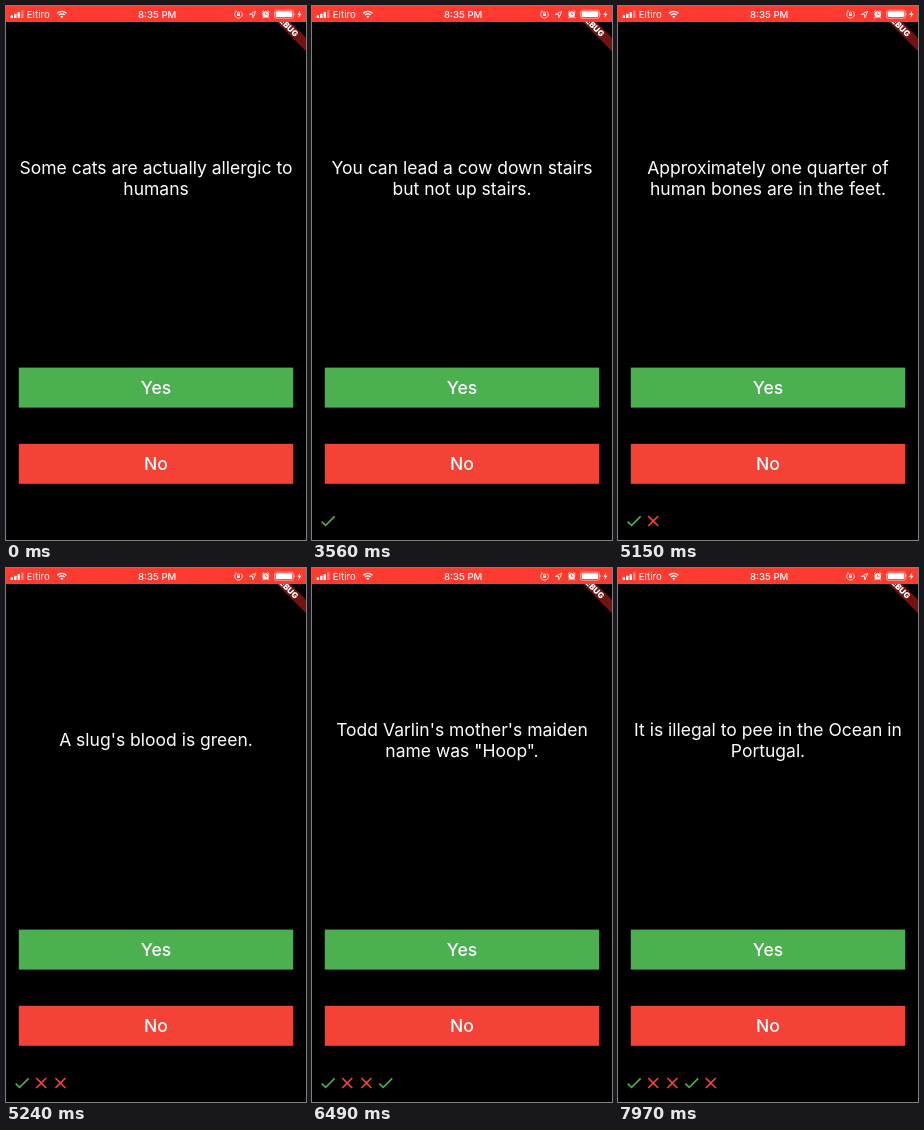
Animation of 300 by 534 pixels, one loop 8 s. Source, as an HTML page:

```html
<!DOCTYPE html>
<html lang="en">
<head>
<meta charset="utf-8">
<title>Quiz</title>
<style>
html, body { margin: 0; width: 100%; height: 100%; overflow: hidden; background: #000; }
svg { display: block; width: 300px; height: 534px; }
text { font-family: Inter, Roboto, "Liberation Sans", sans-serif; font-variation-settings: "opsz" 14; fill: #fff; }
.question, .label { font-size: 17.5px; text-anchor: middle; }
.label { font-weight: 500; }
.status { font-size: 9.6px; }
.line { fill: none; stroke: #fff; }
.yes { fill: #4caf50; }
.no { fill: #f44336; }
</style>
</head>
<body>
<svg viewBox="0 0 300 534">
  <defs>
    <path id="check" d="M9 16.17L4.83 12l-1.42 1.41L9 19 21 7l-1.41-1.41z"/>
    <path id="cross" d="M19 6.41L17.59 5 12 10.59 6.41 5 5 6.41 10.59 12 5 17.59 6.41 19 12 13.41 17.59 19 19 17.59 13.41 12z"/>
  </defs>
  <rect width="300" height="534"/>

  <g transform="translate(300 0) rotate(45)">
    <rect x="-32" y="22.4" width="64" height="9.6" fill="#731212"/>
    <text y="30.1" font-size="8.16" font-weight="900" text-anchor="middle">DEBUG</text>
  </g>

  <rect width="300" height="16" fill="#ff3b30"/>
  <g fill="#fff">
    <rect x="4.6" y="9.2" width="2.4" height="2.8" rx=".5"/>
    <rect x="8.1" y="7.8" width="2.4" height="4.2" rx=".5"/>
    <rect x="11.6" y="6.1" width="2.4" height="5.9" rx=".5"/>
    <rect x="15.1" y="4.3" width="2.4" height="7.7" rx=".5" opacity=".4"/>
  </g>
  <text class="status" x="20.8" y="11.6">Eltiro</text>
  <g class="line" stroke-width="1.4">
    <path d="M51.2 7.2a6.6 6.6 0 0 1 9.2 0M53 9.1a4 4 0 0 1 5.6 0"/>
    <path d="M55.8 12l-1.5-1.6a2.2 2.2 0 0 1 3 0z" fill="#fff" stroke="none"/>
  </g>
  <text class="status" x="151.2" y="11.6" font-weight="500" text-anchor="middle">8:35 PM</text>

  <g class="line" stroke-width=".8">
    <path d="M230.2 5.3a3.8 3.8 0 1 0 4.6 0M229.5 4.2l1.2 1.2-1.5.8"/>
    <rect x="231" y="7.8" width="3" height="2.2" fill="#fff" stroke="none"/>
    <path d="M231.5 8v-1a1 1 0 0 1 2 0v1"/>
    <path d="M243.4 8.4l6.5-3.3-3.1 6.7-.3-3.3z"/>
  </g>
  <circle cx="259.7" cy="8.4" r="3.2" fill="#fff"/>
  <path d="M259.7 6.4v2.2h1.7" fill="none" stroke="#ff3b30" stroke-width=".8"/>
  <path class="line" d="M256 6.2l1.9-1.8M263.4 6.2l-1.9-1.8M257.4 11.2l-.9 1M262 11.2l.9 1" stroke-width="1"/>
  <rect class="line" x="268.5" y="4.1" width="19" height="8.2" rx="2" stroke-width=".7" opacity=".65"/>
  <rect x="269.7" y="5.3" width="16.6" height="5.8" rx="1" fill="#fff"/>
  <path d="M288.4 6.8q1.5 1.4 0 2.8z" fill="#fff" opacity=".65"/>
  <path d="M294.2 4.4l-2.9 4.3h1.8l-.7 3.4 3-4.4h-1.8z" fill="#fff"/>

  <text class="question" id="top" x="150"></text>
  <text class="question" id="bottom" x="150" y="188.8"></text>

  <rect class="yes" x="12.8" y="361.6" width="274.4" height="40"/>
  <text class="label" x="150" y="388">Yes</text>
  <rect class="no" x="12.8" y="437.8" width="274.4" height="40"/>
  <text class="label" x="150" y="464.2">No</text>
  <g id="score"></g>
</svg>
<script>
const LOOP = 8000;
const answers = [true, false, false, true, false];
const steps = [
  [0, "Some cats are actually allergic to", "humans"],
  [1540, "You can lead a cow down stairs", "but not up stairs."],
  [3650, "Approximately one quarter of", "human bones are in the feet."],
  [5240, "A slug's blood is green.", ""],
  [6490, "Todd Varlin's mother's maiden", "name was \"Hoop\"."],
  [7730, "It is illegal to pee in the Ocean in", "Portugal."]
];
const [top1, bottom, score] = ["top", "bottom", "score"].map(id => document.getElementById(id));

const marks = answers.map((right, i) => {
  const mark = document.createElementNS("http://www.w3.org/2000/svg", "use");
  mark.setAttribute("href", right ? "#check" : "#cross");
  mark.setAttribute("class", right ? "yes" : "no");
  mark.setAttribute("transform", `translate(${6.4 + 19.2 * i} 505.4) scale(.8)`);
  return score.appendChild(mark);
});

let shown = -1;
function show(index) {
  if (index === shown) return;
  shown = index;
  const [, first, second] = steps[index];
  top1.textContent = first;
  top1.setAttribute("y", second ? 167.8 : 178.3);
  bottom.textContent = second;
  marks.forEach((mark, i) => mark.setAttribute("visibility", i < index ? "visible" : "hidden"));
}

const start = performance.now();
function tick() {
  const time = (performance.now() - start) % LOOP;
  show(steps.filter(([at]) => at <= time).length - 1);
  requestAnimationFrame(tick);
}
tick();
</script>
</body>
</html>
```
